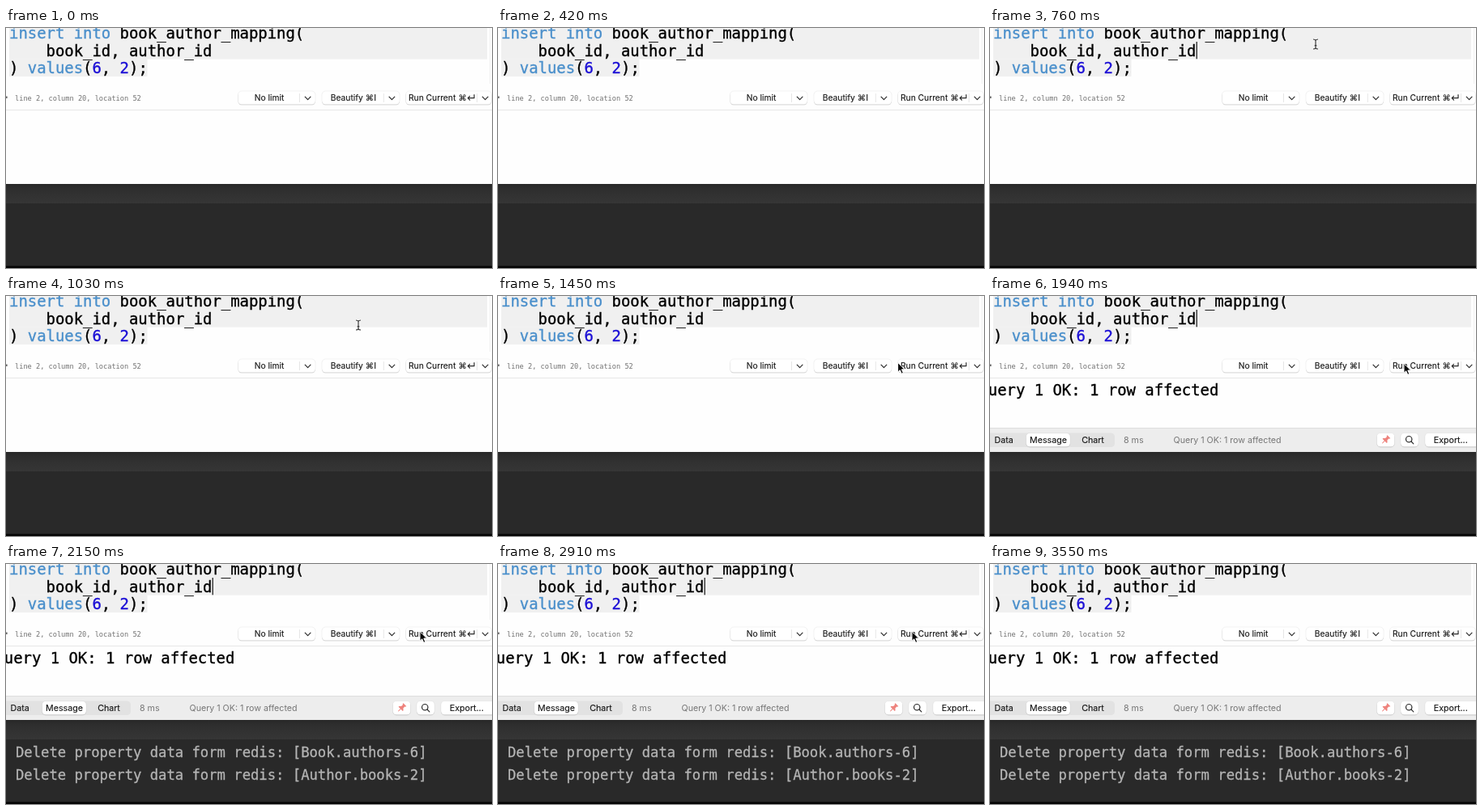
These frames come from a looping animation (600 px wide and 297 px high, 6.85 s). An HTML page:

```html
<!DOCTYPE html>
<html lang="en">
<head>
<meta charset="utf-8">
<title>Query run</title>
<style>
  html, body { margin: 0; width: 100%; height: 100%; overflow: hidden; background: #000; }
  svg { display: block; width: 100%; height: 100%; }
  text { white-space: pre; }
  .code { font: 18.92px "DejaVu Sans Mono", monospace; fill: #000; stroke: #000; stroke-width: .35; }
  .kw { fill: #4a8fcb; stroke: #4a8fcb; }
  .num { fill: #1c0fd6; stroke: #1c0fd6; }
  .ui { font: 10.65px Inter, sans-serif; fill: #141414; stroke: #141414; stroke-width: .12; }
  .small { font-size: 10.25px; }
  .dim { fill: #757575; stroke: none; }
  .pos { font: 8.63px "DejaVu Sans Mono", monospace; fill: #707070; }
  .log { font: 17.22px "DejaVu Sans Mono", monospace; fill: #b4b4b4; stroke: #b4b4b4; stroke-width: .3; }
  .line { fill: none; stroke: #2a2a2a; stroke-width: 1.2; stroke-linecap: round; stroke-linejoin: round; }
</style>
</head>
<body>
<svg id="stage" viewBox="0 0 600 297"></svg>
<script>
const LOOP = 6850;
const RESULT_AT = 1880, LOG_AT = 2150;

const rect = (x, y, w, h, fill, more = '') =>
  `<rect x="${x}" y="${y}" width="${w}" height="${h}" fill="${fill}" ${more}/>`;
const text = (x, y, cls, s, more = '') => `<text x="${x}" y="${y}" class="${cls}" ${more}>${s}</text>`;
const path = (d, more = 'class="line"') => `<path d="${d}" ${more}/>`;
const span = (cls, s) => `<tspan class="${cls}">${s}</tspan>`;

const button = (x, y, w, h) =>
  rect(x, y + 0.9, w, h, '#000', 'rx="4.5" opacity=".13"') +
  rect(x, y, w, h, '#fff', 'rx="4.5" stroke="#000" stroke-opacity=".08" stroke-width=".7"');

const dropdown = (x, w, split) =>
  button(x, 78, w, 16.6) +
  rect(split, 81, 0.8, 11, '#e0e0e0') +
  path(`M${split + 7.2} 85.2l3.4 3.4l3.4 -3.4`);

const editor =
  rect(0, 0, 600, 193, '#fefefe') +
  rect(4, 0, 590, 38.5, '#f0f0f0') +
  rect(4, 38.5, 170.5, 21.5, '#f0f0f0') +
  rect(597, 0, 1, 69, '#f0f0f0') +
  text(4, 12.7, 'code', span('kw', 'insert into') + ' book_author_mapping(') +
  text(4, 34.6, 'code', '    book_id, author_id') +
  text(4, 55.9, 'code', `) ${span('kw', 'values')}(${span('num', '6')}, ${span('num', '2')});`);

const toolbar =
  rect(0, 84.5, 1.6, 2.5, '#666') +
  text(11, 90.3, 'pos', 'line 2, column 20, location 52') +
  dropdown(286.5, 95.5, 362) +
  text(325, 90.2, 'ui small', 'No limit', 'text-anchor="middle"') +
  dropdown(390, 96, 465.8) +
  text(400.8, 90.2, 'ui small', 'Beautify') +
  text(443.8, 90.2, 'ui small', '⌘') + text(454.3, 90.2, 'ui small', 'I') +
  dropdown(493.5, 106, 581) +
  text(497, 90.2, 'ui small', 'Run Current') + text(558.5, 90.2, 'ui small', '⌘') +
  path('M578 82.7v4h-7.8M572.6 84.3l-2.4 2.4l2.4 2.4') +
  rect(0, 101, 600, 0.9, '#e4e4e4');

const desk =
  rect(0, 193, 600, 24.5, 'url(#shade)') +
  rect(0, 217, 600, 78, '#292929') +
  rect(0, 294.5, 600, 2.5, '#050505');

const result =
  text(-13.6, 122.7, 'code', 'Query 1 OK: 1 row affected') +
  rect(0, 163, 600, 30, '#ededed') +
  rect(0, 163, 600, 1, '#dedede') +
  rect(-10, 169.5, 164, 17.5, '#e2e2e2', 'rx="4.5"') +
  button(44.5, 169.7, 54.5, 16.8) +
  text(5.5, 182, 'ui', 'Data') +
  text(72, 182, 'ui', 'Message', 'text-anchor="middle"') +
  text(127, 182, 'ui', 'Chart', 'text-anchor="middle"') +
  text(165, 182, 'ui dim', '8 ms') +
  text(226.5, 182, 'ui dim', 'Query 1 OK: 1 row affected') +
  button(477.5, 169.5, 22, 17) +
  `<g transform="translate(488.5 178) rotate(45)" fill="#ee837d">` +
  path('M-2.6 -5.5h5.2v1.2l-.9 .6v2.7l2 1.8v1.1h-7.4v-1.1l2 -1.8v-2.7l-.9 -.6zM-.5 2h1v4h-1z', '') + '</g>' +
  button(507, 169.5, 22, 17) +
  '<circle cx="517.2" cy="177.2" r="3.7" class="line"/>' + path('M520 180l2.8 2.8') +
  button(537, 169.5, 70, 17) +
  text(547.8, 182, 'ui', 'Export...');

const log =
  text(12, 239, 'log', 'Delete property data form redis: [Book.authors-6]') +
  text(12, 267, 'log', 'Delete property data form redis: [Author.books-2]');

const beamShape = 'M-3 -6q2.4 0 3 1.2q.6 -1.2 3 -1.2M0 -4.8v9.6M-3 6q2.4 0 3 -1.2q.6 1.2 3 1.2M-1.4 1.8h2.8';
const arrowShape = 'M0 0v11.8l2.7 -2.5l2 4.5l2.1 -.9l-2 -4.4h3.8z';

const stage = document.getElementById('stage');
stage.innerHTML =
  `<defs><linearGradient id="shade" x2="0" y2="1">
    <stop offset="0" stop-color="#282828"/><stop offset=".25" stop-color="#2e2e2e"/>
    <stop offset="1" stop-color="#363636"/></linearGradient></defs>` +
  desk + editor + toolbar +
  `<g id="result">${result}</g><g id="log">${log}</g>` +
  rect(254.6, 17, 1.2, 21.3, '#111', 'id="caret"') +
  `<g id="beam" fill="none">` +
  path(beamShape, 'stroke="#fff" stroke-width="2.4"') +
  path(beamShape, 'stroke="#222" stroke-width="1.1"') + '</g>' +
  path(arrowShape, 'id="arrow" fill="#080808" stroke="#fff" stroke-width="1" stroke-linejoin="round"');

const el = id => document.getElementById(id);
const [resultEl, logEl, caret, beam, arrow] = ['result', 'log', 'caret', 'beam', 'arrow'].map(el);

// Pointer stops: time, x, y
const stops = [[760, 402, 20], [1030, 435, 36], [1120, 435, 36], [1390, 488, 82], [1580, 511, 83.5]];
const POINTER_END = 3390;
const blinks = [[470, 980], [1700, 2360], [2910, 3550]];

const ease = u => u * u * (3 - 2 * u);
const show = (node, on) => node.setAttribute('visibility', on ? 'visible' : 'hidden');

function pointerAt(t) {
  const i = stops.findIndex(s => s[0] > t);
  if (i < 0) return stops[stops.length - 1].slice(1);
  if (i === 0) return stops[0].slice(1);
  const [t0, x0, y0] = stops[i - 1], [t1, x1, y1] = stops[i];
  const u = ease((t - t0) / (t1 - t0));
  return [x0 + (x1 - x0) * u, y0 + (y1 - y0) * u];
}

function draw(t) {
  show(resultEl, t >= RESULT_AT);
  show(logEl, t >= LOG_AT);
  show(caret, blinks.some(([on, off]) => t >= on && t < off));
  const [x, y] = pointerAt(t);
  const live = t >= stops[0][0] && t < POINTER_END;
  const overText = y < 68;
  show(beam, live && overText);
  show(arrow, live && !overText);
  for (const node of [beam, arrow]) node.setAttribute('transform', `translate(${x} ${y})`);
}

const start = performance.now();
function tick() {
  draw((performance.now() - start) % LOOP);
  requestAnimationFrame(tick);
}
tick();
</script>
</body>
</html>
```
